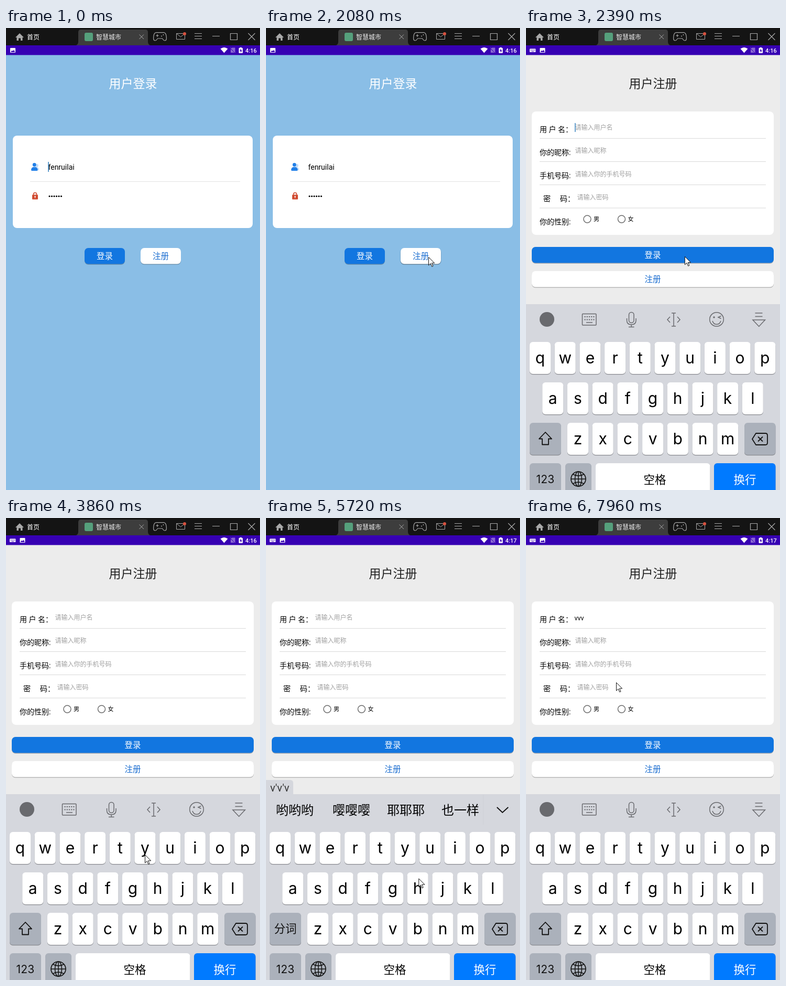
Recreate the animation shown at these times as an HTML page. Size 485x880 px, loop 8000 ms.

```html
<!DOCTYPE html>
<html lang="zh-CN">
<head>
<meta charset="utf-8">
<style>
html, body { margin: 0; width: 100%; height: 100%; overflow: hidden; background: #141414; }
svg { display: block; width: 485px; height: 880px; }
text { font-family: Roboto, 'Noto Sans CJK SC', 'Noto Sans CJK', sans-serif; white-space: pre; }
.key { font-family: Inter, 'Noto Sans CJK SC', sans-serif; }
</style>
</head>
<body>
<svg id="stage" viewBox="0 0 485 880"></svg>
<script>
const LOOP = 8000;
const BLUE = '#1276e0', KEYBOARD = '#d5d7dd', DARK_KEY = '#abb1bb';

const box = (x, y, w, h, fill, r = 0, more = '') =>
  `<rect x="${x}" y="${y}" width="${w}" height="${h}" rx="${r}" fill="${fill}" ${more}/>`;
const disc = (x, y, r, fill, more = '') => `<circle cx="${x}" cy="${y}" r="${r}" fill="${fill}" ${more}/>`;
const line = (d, color, w = 1, more = '') =>
  `<path d="${d}" fill="none" stroke="${color}" stroke-width="${w}" ${more}/>`;
const shape = (d, fill, more = '') => `<path d="${d}" fill="${fill}" ${more}/>`;
const text = (s, x, y, size, fill, more = '') =>
  `<text x="${x}" y="${y}" font-size="${size}" fill="${fill}" ${more}>${s}</text>`;
const mid = 'text-anchor="middle"';
const group = (id, content) => `<g id="${id}">${content}</g>`;

const button = (x, y, w, label, fill, color) =>
  box(x, y + 1.2, w, 30.5, '#000', 7, 'opacity=".28"') + box(x, y, w, 30.5, fill, 7) +
  text(label, x + w / 2, y + 21, 15.5, color, mid);

function titleBar() {
  const g = '#a9a9a9';
  return box(0, 0, 485, 33, '#141414') +
    shape('M134 33Q138 31 138 26V8Q138 3 143 3H266Q271 3 271 8V26Q271 31 275 33Z', '#3d3d3d') +
    shape('M18 18L26 10L34 18H31.500V24H28V19.500H24V24H20.500V18Z', g) +
    text('首页', 40, 22, 12, '#fff') +
    box(150, 9, 16, 16, '#55a07c', 3) +
    text('智慧城市', 172, 22, 12, '#f0f0f0') +
    line('M254.500 12.500L263 21M263 12.500L254.500 21', g) +
    line('M287 8.700H301Q305 8.700 306 15Q307.500 24 303.500 24Q301 24 298.500 20H289.500Q287 24 284.500 24Q280.500 24 282 15Q283 8.700 287 8.700Z', g, 1.2) +
    line('M286.500 14.500H291.500M289 12V17', g, 1.2) + disc(297, 15.500, 1, g) + disc(300.500, 13, 1, g) +
    line('M325.500 10.500H341.500V21.500H325.500ZL333.500 17L341.500 10.500', g) + disc(341, 11, 3, '#d9523f') +
    line('M360 10.500H374M360 15.500H374M360 20.500H374M394 15.500H408', g, 1.2) +
    line('M428.500 10.500H441.500V22.500H428.500ZM462.500 10L475.500 23M475.500 10L462.500 23', g, 1.2);
}

function statusBar() {
  const photo = box(8, 38, 10, 9, '#fff', 1) + shape('M9 46L11.500 42.500L13 44.300L15 41.500L17.200 46Z', '#3700b3');
  return box(0, 33, 485, 18.5, '#3700b3') + group('photo', photo) +
    group('imeIcon', box(7, 39.5, 11.5, 6.5, '#fff', 1) +
      line('M8.500 41.500H17.500M8.500 43.200H17.500', '#3700b3', .9, 'stroke-dasharray="1 1"') +
      line('M10.500 44.800H15', '#3700b3', .8)) +
    shape('M409.500 39.500Q416.500 34.500 423.500 39.500L416.500 47.500Z', '#fff') +
    shape('M431.500 37.500H437.500V47H429V40Z', '#8a68d2') + line('M428 38L438 47.500', '#3700b3', 1.4) +
    line('M428.500 37.500L438 47', '#9a7cd8') +
    box(444.5, 38, 7.5, 10, '#fff', 1) + box(446.5, 37, 3.5, 2, '#fff') +
    shape('M449 39.500L446 43.800H448V47L450.800 42.500H449Z', '#3700b3') +
    `<text id="clock" x="457" y="46.500" font-size="11" font-weight="500" fill="#fff"></text>`;
}

function loginPage() {
  let dots = '';
  for (let i = 0; i < 6; i++) dots += disc(83 + i * 4.5, 320.5, 1.55, '#000');
  return box(0, 51, 485, 829, '#8abee6') +
    text('用户登录', 242.5, 113.5, 23, '#fff', mid + ' font-weight="500"') +
    box(13, 205, 458, 176, '#fff', 8) +
    disc(58.5, 262, 3.3, '#c3dcf7') + shape('M56 271Q63 272 63 269Q62 264.500 57 265.500Z', '#c3dcf7') +
    disc(54.2, 260.5, 3.4, '#2280e8') + shape('M48 270.500Q48 264.800 54.200 264.800Q60.500 264.800 60.500 270.500Q60.500 272 58.500 272H50Q48 272 48 270.500Z', '#2280e8') +
    text('fenruilai', 80.5, 270, 14, '#000') +
    line('M46 292.500H447', '#e3e3e3') +
    line('M52.500 318V316.500Q52.500 313.800 55.500 313.800Q58.500 313.800 58.500 316.500V318', '#d14c32', 1.5) +
    box(50, 317.5, 11, 9, '#d14c32', 1) + disc(55.5, 321, 1.2, '#fff') + box(55, 321, 1, 3, '#fff') + dots +
    button(150, 419, 77, '登录', BLUE, '#fff') +
    group('pressed', box(256, 420, 79, 31, '#000', 8, 'opacity=".12"')) +
    button(257, 419, 77, '注册', '#fff', '#1a6dd0') +
    group('loginCaret', box(80.3, 255, 1.5, 19, '#2c7dbe'));
}

function registerPage() {
  const fields = [['用 户 名：', '请输入用户名'], ['你的昵称:', '请输入昵称'], ['手机号码:', '请输入你的手机号码'], ['', '请输入密码']];
  const radio = (x, label) => disc(x, 364, 7, 'none', 'stroke="#6e6e6e" stroke-width="1.500"') + text(label, x + 12, 368.3, 11, '#000');
  let out = box(0, 33, 485, 18.5, '#3700b3') + box(0, 51, 485, 829, '#ececec') +
    text('用户注册', 242.5, 113.5, 23, '#222', mid + ' font-weight="500"') + box(11, 159, 462, 235, '#fff', 8);
  fields.forEach(([label, hint], i) => {
    const y = 197.5 + i * 44.2;
    out += text(label, 26, y, 14, '#000') +
      text(hint, i == 3 ? 97.5 : 93.5, y - 3.4, 12, '#a0a0a0', i ? '' : 'id="hint"') +
      line(`M26 ${y + 12.8}H458`, '#d8d8d8');
  });
  return out + text('密', 33, 330, 14, '#000') + text('码：', 65, 330, 14, '#000') +
    text('你的性别:', 26, 374, 14, '#000') + radio(117, '男') + radio(182.5, '女') +
    text('vvv', 92.5, 195, 12.5, '#000', 'id="entry"') +
    button(11, 417, 462, '登录', BLUE, '#fff') + button(11, 463, 462, '注册', '#fff', '#1a6dd0') +
    group('caret', box(93.2, 181, 1.4, 17, '#2c7dbe'));
}

function keyboard() {
  const pitch = 47.7, g = '#696a6e';
  const key = (x, y, w, fill = '#fff', id = '') =>
    box(x, y + 1.3, w, 61, '#898b90', 6) + box(x, y, w, 61, fill, 6, id && `id="${id}"`);
  let out = box(0, 526, 485, 360, KEYBOARD);
  [['qwertyuiop', 7], ['asdfghjkl', 31.2], ['zxcvbnm', 79]].forEach(([row, x0], r) => {
    [...row].forEach((c, i) => {
      const x = x0 + i * pitch, y = 598 + r * 77;
      out += key(x, y, 40, '#fff', c == 'y' ? 'hitKey' : '') + text(c, x + 20, y + 41, 30, '#000', mid + ' class="key"');
    });
  });
  out += key(7, 752, 60, DARK_KEY) + key(417, 752, 59.5, DARK_KEY) + key(7, 829, 60, DARK_KEY) +
    key(75, 829, 50, DARK_KEY) + key(133, 829, 218.5) + key(359, 829, 117.5, '#007aff') +
    text('123', 37, 867, 21, '#111', mid + ' letter-spacing=".300" class="key"') +
    text('空格', 246, 867.5, 21.5, '#000', mid) + text('换行', 418, 867.5, 21.5, '#fff', mid) +
    line('M439 772H457Q461 772 461 776V790Q461 794 457 794H439L432 783ZM443 778.500L452 787.500M452 778.500L443 787.500', '#111', 1.8, 'stroke-linejoin="round"') +
    line('M86 859H114M100 845V873M89.500 850Q100 856 110.500 850M89.500 868Q100 862 110.500 868', '#111', 1.5) +
    disc(100, 859, 14, 'none', 'stroke="#111" stroke-width="1.700"') +
    '<ellipse cx="100" cy="859" rx="6.500" ry="14" fill="none" stroke="#111" stroke-width="1.500"/>';

  let tools = disc(40, 555, 14, g) +
    line('M108.500 544.500H133Q134 544.500 134 545.500V565Q134 566 133 566H108.500Q107.500 566 107.500 565V545.500Q107.500 544.500 108.500 544.500ZM115 561H127', g, 1.5) +
    line('M111.500 550H131M111.500 555.500H131', g, 2, 'stroke-dasharray="2.200 2"') +
    box(196.5, 541.5, 9.5, 20, 'none', 4.75, `stroke="${g}" stroke-width="1.500"`) +
    line('M192.500 553V557Q192.500 565 201.200 565Q210 565 210 557V553M201.200 565V569.500M196 569.500H206.500', g, 1.5) +
    line('M278 543H286M282 543V568M278 568H286M275 550L270 555.500L275 561M289 550L294 555.500L289 561', g, 1.5) +
    disc(364, 555, 13.3, 'none', `stroke="${g}" stroke-width="1.500"`) + disc(359, 551, 1.7, g) +
    line('M372.500 548.500L367 551L372.500 553.500M356 558Q358 564.500 364 564.500Q370 564.500 372 558', g, 1.5) +
    line('M437.500 543H451.500M437.500 549.500H451.500M433 556H456.500L444.800 568.500Z', g, 1.5) +
    line('M37 770L49 782.500H43V793.500H31V782.500H25Z', '#111', 1.8, 'stroke-linejoin="round"');

  const words = (id, list, xs) => group(id, list.map((w, i) => text(w, xs[i], 565, 24, '#000')).join(''));
  const input = box(414.5, 527, 1, 57, '#cfd1d7') + line('M441 551L451.500 561L462.500 551', '#111', 2) +
    text('分词', 37, 790, 21.5, '#111', mid) +
    words('words1', ['一', '有', '也', '要', '以', '用'], [19, 79, 139, 199, 259, 319]) +
    words('words2', ['应用', '医院', '语音', '意愿'], [19, 103, 187, 271]) +
    words('words3', ['哟哟哟', '嘤嘤嘤', '耶耶耶', '也一样'], [19, 127, 231, 335]);
  const popup = `<path id="bubble" fill="${KEYBOARD}"/>` + text('', 8, 521, 20, '#333', 'id="spell"');
  return out + group('tools', tools) + group('input', input) + group('popup', popup);
}

document.getElementById('stage').innerHTML =
  group('login', loginPage()) + group('register', registerPage()) + group('keyboard', keyboard()) +
  titleBar() + statusBar() +
  group('mouse', '<path d="M.500 .500V16L4.200 12.600L6.800 18.500L9 17.500L6.500 11.800H11.700Z" fill="#fff" stroke="#111" stroke-linejoin="round"/>');

const $ = id => document.getElementById(id);
const show = (id, on) => $(id).style.display = on ? '' : 'none';
const within = (t, ...spans) => spans.some(([a, b]) => t >= a && t < b);
const clamp = v => Math.max(0, Math.min(1, v));

// time, x, y of the pointer tip
const path = [
  [370, 440, 824], [560, 412, 640], [690, 398, 556], [850, 345, 470], [990, 290, 428], [1140, 288, 427],
  [1290, 310, 432], [1530, 311, 435], [1700, 310, 436], [2240, 310, 436], [2390, 303, 435],
  [2620, 262, 402], [2850, 228, 386], [3010, 225, 405], [3300, 238, 560], [3550, 254, 687],
  [3780, 265, 650], [3860, 265, 641], [5500, 265, 641], [5640, 280, 670], [5720, 291, 686],
  [6050, 370, 820], [6250, 410, 862], [6410, 400, 825], [6490, 396, 824], [6640, 330, 798],
  [6870, 328, 797], [7040, 311, 789], [7400, 311, 789], [7650, 240, 560], [7880, 176, 322], [7960, 172, 313]
];

function pointer(t) {
  const i = path.findIndex(p => p[0] > t);
  if (i < 0) return path[path.length - 1].slice(1);
  const [t0, x0, y0] = path[Math.max(0, i - 1)], [t1, x1, y1] = path[i];
  const k = clamp((t - t0) / (t1 - t0));
  return [x0 + (x1 - x0) * k, y0 + (y1 - y0) * k];
}

function draw(t) {
  const second = t >= 2240, done = t >= 7420;
  const typed = done || t < 4320 ? 0 : t < 5330 ? 1 : t < 5480 ? 2 : 3;

  show('login', t < 2390);
  show('loginCaret', within(t, [0, 70], [530, 990], [1460, 2000]));
  show('pressed', within(t, [1930, 2240]));

  const p = clamp((t - 2240) / 130);
  show('register', second);
  $('register').setAttribute('transform', `translate(0 ${25 * (1 - p) ** 2})`);
  $('register').setAttribute('opacity', .78 + .22 * p);
  show('caret', (t - 2180) % 1000 < 500);
  $('caret').setAttribute('transform', `translate(${done ? 19 : 0} 0)`);
  show('hint', !done);
  show('entry', done);

  const up = clamp((t - 2290) / 90);
  show('keyboard', up > 0);
  $('keyboard').setAttribute('transform', `translate(0 ${354 * (1 - up) ** 2})`);
  show('tools', !typed);
  show('input', typed);
  for (let i = 1; i < 4; i++) show('words' + i, typed == i);
  show('popup', typed && t >= 4630);
  const w = [0, 18, 35, 52][typed];
  $('bubble').setAttribute('d', `M0 527V499H${w - 6}Q${w} 499 ${w} 505V527Z`);
  $('spell').textContent = Array(typed).fill('v').join("'");
  $('hitKey').setAttribute('fill', within(t, [3980, 4100], [5330, 5400], [5440, 5490]) ? DARK_KEY : '#fff');

  show('imeIcon', t >= 2390);
  $('photo').setAttribute('transform', `translate(${t >= 2390 ? 18.5 : 0} 0)`);
  $('clock').textContent = t < 4630 ? '4:16' : '4:17';

  show('mouse', t >= 370);
  $('mouse').setAttribute('transform', `translate(${pointer(t)})`);
}

function tick() {
  draw(performance.now() % LOOP);
  requestAnimationFrame(tick);
}
tick();
</script>
</body>
</html>
```
